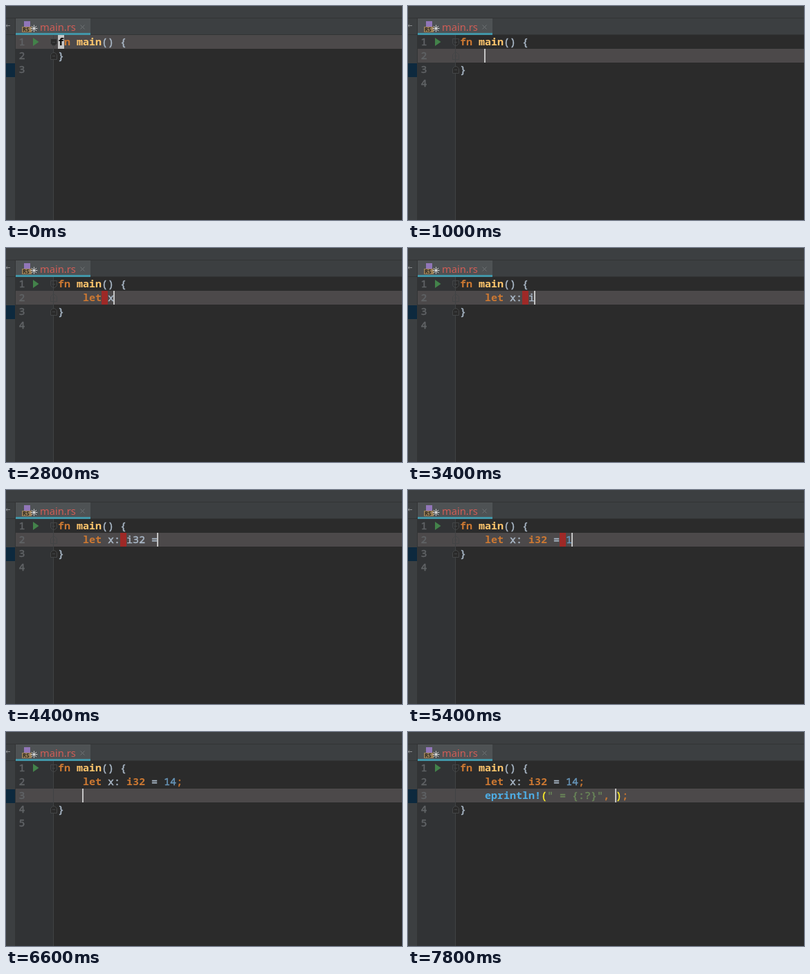
Write an HTML page with a canvas that moves like this. It is 572 px wide and 310 px high and loops after 8000 ms.

```html
<!DOCTYPE html>
<html lang="en">
<head>
<meta charset="utf-8">
<title>Code editor</title>
<style>
html, body { margin: 0; width: 100%; height: 100%; overflow: hidden; background: #2b2b2b; }
canvas { display: block; }
</style>
</head>
<body>
<canvas id="stage" width="572" height="310"></canvas>
<script>
const ctx = document.getElementById('stage').getContext('2d');
const LOOP = 8000, LEFT = 75, TOP = 42, CELL = 9, ROW = 20;
const MONO = '15px "Noto Sans Mono", "DejaVu Sans Mono", monospace';
const C = {
  panel: '#3c3f41', edge: '#323435', editor: '#2b2b2b', gutter: '#313335', current: '#4c494a',
  text: '#a9b7c6', key: '#cc7832', fn: '#ffc66d', num: '#6897bb', str: '#6a8759',
  macro: '#4eade5', brace: '#ffef28', error: '#9e2927', caret: '#c4c4c4', fold: '#434546'
};

const LET = 'let x: i32 = 14;';
// [time, characters of LET typed]
const TYPED = [[1000, 0], [1800, 1], [2000, 2], [2200, 3], [2400, 4], [2800, 5], [3000, 6], [3200, 7],
  [3400, 8], [4000, 10], [4400, 12], [4600, 13], [5400, 14], [5600, 15], [5800, 16]];
// [time, column of the syntax error, -1 for none]
const ERRORS = [[0, -1], [2400, 7], [3400, 10], [4800, 16], [5600, 19], [5800, 20], [6200, -1]];

const at = (steps, t) => steps.reduce((v, [time, next]) => t >= time ? next : v, steps[0][1]);
const colX = col => LEFT + col * CELL;
const rowY = row => TOP + (row - 1) * ROW;

function rect(x, y, w, h, color) {
  ctx.fillStyle = color;
  ctx.fillRect(x, y, w, h);
}

function label(text, x, y, font, color) {
  ctx.font = font;
  ctx.fillStyle = color;
  ctx.fillText(text, x, y);
}

// Code text; a thin outline gives the plain weight its medium look
function code(text, x, row, color, bold) {
  const y = rowY(row) + 15;
  label(text, x, y, (bold ? '600 ' : '') + MONO, color);
  if (bold) return;
  ctx.strokeStyle = color;
  ctx.lineWidth = 0.45;
  ctx.strokeText(text, x, y);
}

const put = (row, col, text, color = C.text, bold = false) => code(text, colX(col), row, color, bold);

function path(points, stroke, fill) {
  ctx.beginPath();
  points.forEach(([x, y]) => ctx.lineTo(x, y));
  if (fill) {
    ctx.closePath();
    ctx.fillStyle = fill;
    ctx.fill();
  }
  if (stroke) {
    ctx.strokeStyle = stroke;
    ctx.lineWidth = 1;
    ctx.stroke();
  }
}

const caret = (row, col) => rect(colX(col) - 1, rowY(row), 2, ROW, C.caret);

function block(row, col, char, bold) {
  rect(colX(col), rowY(row), CELL, ROW, C.caret);
  put(row, col, char, '#000', bold);
}

// Fold handle: dir 1 points down, -1 points up
function fold(row, dir, fill) {
  const y = rowY(row) + 10.5, p = (x, dy) => [x, y + dy * dir];
  path([p(64.5, -5), p(73.5, -5), p(73.5, 2), p(70.5, 5), p(67.5, 5), p(64.5, 2), p(64.5, -5)],
    C.fold, fill);
  path([[67, y], [71, y]], C.fold);
}

function frame() {
  rect(0, 0, 572, 310, C.editor);
  rect(0, 0, 572, 42, C.panel);
  rect(0, 17, 572, 1, C.edge);
  rect(0, 41, 572, 1, C.edge);

  // Side panel
  rect(0, 42, 13, 268, C.panel);
  rect(0, 83, 13, 20, '#0d293e');
  rect(13, 18, 1, 292, C.edge);
  rect(0, 28, 6, 1, '#8a8d8f');
  path([[2, 26.5], [0, 28.5], [2, 30.5]], '#8a8d8f');

  // Tab
  rect(14, 18, 108, 21, '#4e5254');
  rect(14, 39, 108, 3, '#4296a8');
  rect(26, 22, 9, 8, '#9176b8');
  rect(23, 30, 14, 8, '#9c8158');
  label('RS', 24, 37, 'bold 8px "Noto Sans", sans-serif', '#2f2a22');
  for (let i = 0; i < 4; i++) {
    const a = i * Math.PI / 4, dx = 5 * Math.cos(a), dy = 5 * Math.sin(a);
    path([[40.5 - dx, 32.5 - dy], [40.5 + dx, 32.5 + dy]], '#d0d0d0');
  }
  label('main.rs', 49, 36, '14.67px "Noto Sans", "Open Sans", sans-serif', '#d05d56');
  path([[107.5, 27.5], [113.5, 33.5]], '#6e7274');
  path([[113.5, 27.5], [107.5, 33.5]], '#6e7274');

  rect(14, 42, 55, 268, C.gutter);
}

function editor(t) {
  const row = t < 1000 ? 1 : t < 6600 ? 2 : 3;
  const last = row + 1;
  rect(14, rowY(row), 558, ROW, C.current);
  rect(68, 42, 1, 268, '#404244');
  for (let n = 1; n <= last + 1; n++) code(n, 18.5, n, '#606366');
  path([[39, 46], [47.5, 52], [39, 58]], null, '#43824a');
  fold(1, 1, row === 1 ? C.editor : null);
  if (row === 2) fold(2, -1);
  fold(last, -1, C.editor);

  put(1, 0, 'fn', C.key, true);
  put(1, 3, 'main', C.fn, true);
  put(1, 7, '() {');
  put(last, 0, '}');
  if (row === 1) return block(1, 0, 'f', true);

  letLine(t);
  if (row === 3) printLine(t);
}

function letLine(t) {
  const count = at(TYPED, t), error = at(ERRORS, t);
  if (error >= 0) rect(colX(error), rowY(2), CELL, ROW, C.error);
  const part = (from, to, color, bold) => put(2, 4 + from, LET.slice(from, Math.min(to, count)), color, bold);
  const typeKnown = t >= 4800;
  part(0, 3, count < 3 ? C.text : C.key, count >= 3);
  if (count > 3) part(3, 7);
  if (count > 7) part(7, 10, typeKnown ? C.key : C.text, typeKnown);
  if (count > 10) part(10, 13);
  if (count > 13) part(13, 15, C.num);
  if (count > 15) part(15, 16, C.key);
  if (t < 6200) caret(2, 4 + count);
  else if (t < 6600) block(2, 19, ';');
}

function printLine(t) {
  if (t < 7400) {
    const count = t < 7000 ? 0 : t < 7200 ? 1 : 2;
    put(3, 4, 'ep'.slice(0, count));
    return caret(3, 4 + count);
  }
  const resolved = t >= 7800;
  put(3, 4, 'eprintln!', resolved ? C.macro : C.text, resolved);
  put(3, 13, '(', C.brace);
  put(3, 14, '" = {:?}"', C.str);
  put(3, 23, ',', C.key);
  put(3, 25, ')', C.brace);
  put(3, 26, ';', C.key);
  caret(3, 25);
}

function draw() {
  frame();
  editor(performance.now() % LOOP);
  requestAnimationFrame(draw);
}
draw();
</script>
</body>
</html>
```
